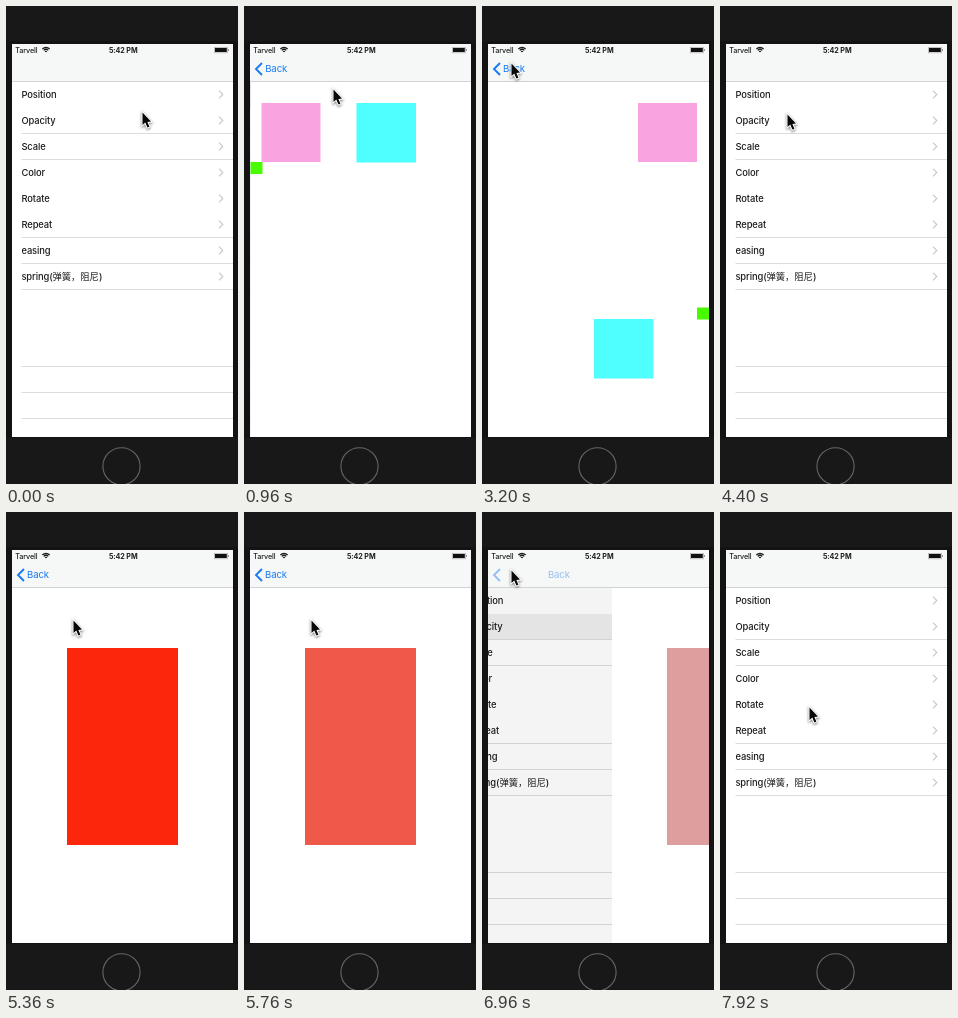
An HTML page with a canvas that plays this animation: 232 px wide and 478 px high, repeating every 8000 ms.

```html
<!DOCTYPE html>
<html lang="en">
<head>
<meta charset="utf-8">
<style>
html, body { margin: 0; width: 100%; height: 100%; overflow: hidden; background: #181818; }
canvas { display: block; width: 232px; height: 478px; }
</style>
</head>
<body>
<canvas width="232" height="478"></canvas>
<script>
const ctx = document.querySelector('canvas').getContext('2d');
const LOOP = 8000, STEP = 80;
const SCREEN = { x: 6, y: 38, w: 221, h: 393 };
const FONT = 'Inter, "Noto Sans CJK SC", "Noto Sans CJK", sans-serif';
const ROWS = ['Position', 'Opacity', 'Scale', 'Color', 'Rotate', 'Repeat', 'easing', 'spring(弹簧，阻尼)'];
const RULES = [127, 153, 231, 257, 283, 360, 386, 412];

// Each visit opens a detail page from a row and later goes back to the list.
const VISITS = [
  { row: 0, push: [560, 1020], pop: [3280, 3800], draw: drawPosition },
  { row: 1, push: [4640, 5200], pop: [6840, 7340], draw: drawOpacity }
];

// Pointer stops: time, x, y
const POINTER = [
  [0, 136, 106], [160, 96, 90], [240, 96, 90], [400, 89, 83], [1360, 89, 83],
  [1840, 22, 53], [2000, 22, 53], [2560, 29, 57], [3440, 29, 57], [4000, 32, 101],
  [4400, 67, 108], [5840, 67, 108], [6320, 47, 85], [6640, 29, 58], [7120, 29, 58],
  [7920, 89, 195]
];

const ramp = (t, from, to) => Math.min(1, Math.max(0, (t - from) / (to - from)));
const mix = (a, b, p) => a + (b - a) * p;
const easeOut = p => 1 - (1 - p) ** 3;

// cubic-bezier(.42, 0, .58, 1)
function easeInOut(p) {
  let lo = 0, hi = 1;
  for (let i = 0; i < 20; i++) {
    const s = (lo + hi) / 2;
    const x = 1.26 * (1 - s) ** 2 * s + 1.74 * (1 - s) * s * s + s ** 3;
    if (x < p) lo = s; else hi = s;
  }
  return lo * lo * (3 - 2 * lo);
}

function rect(color, x, y, w, h) {
  ctx.fillStyle = color;
  ctx.fillRect(x, y, w, h);
}

function text(str, x, y, size, color = '#1c1c1c', weight = 500, align = 'left') {
  ctx.font = `${weight} ${size}px ${FONT}`;
  ctx.letterSpacing = '-0.1px';
  ctx.textAlign = align;
  ctx.textBaseline = 'alphabetic';
  ctx.fillStyle = color;
  ctx.fillText(str, x, y);
}

function line(points, color, width) {
  ctx.beginPath();
  points.forEach(([x, y]) => ctx.lineTo(x, y));
  ctx.strokeStyle = color;
  ctx.lineWidth = width;
  ctx.stroke();
}

function drawList(selected, highlight) {
  rect('#fff', 6, 38, 221, 393);
  if (highlight > 0) {
    ctx.globalAlpha = highlight;
    rect('#d9d9d9', 6, 76 + selected * 26, 221, 26);
    ctx.globalAlpha = 1;
  }
  RULES.forEach(y => rect('#dcdcde', 15.5, y, 211.5, 1));
  ROWS.forEach((label, i) => {
    const y = 88.5 + i * 26;
    text(label, 15.4, y + 3.3, 9.4);
    line([[213, y - 3.8], [216.8, y], [213, y + 3.8]], '#c7c7cb', 1.1);
  });
}

function drawPosition(t) {
  const moved = start => easeInOut(ramp(t, start, start + 940));
  rect('#f9a4e0', mix(17, 156, moved(1020)), 97, 59, 59);
  rect('#4fffff', 112, mix(97, 313, moved(1510)), 59.5, 59.5);
  const p = moved(2075);
  rect('#48fb00', mix(6, 215, p), mix(156, 301.5, p), 12, 12);
}

function drawOpacity(t) {
  const p = easeInOut(ramp(t, 5330, 6270));
  const channels = [mix(252, 221, p), mix(38, 158, p), mix(13, 157, p)].map(Math.round);
  rect(`rgb(${channels})`, 61, 136, 111, 197);
}

function drawBar(open) {
  rect('#f6f7f7', 6, 38, 221, 37);
  rect('#d0d4d4', 6, 75, 221, 1);

  text('Tarvell', 9.2, 46.6, 7.2);
  text('5:42 PM', 117.2, 46.6, 7.2, '#1c1c1c', 700, 'center');
  ctx.strokeStyle = '#1c1c1c';
  ctx.lineWidth = 1.3;
  for (const r of [1.2, 3.2, 5.1]) {
    ctx.beginPath();
    ctx.arc(40, 46.6, r, -Math.PI * 0.75, -Math.PI * 0.25);
    ctx.stroke();
  }
  ctx.strokeStyle = '#b4b4b4';
  ctx.lineWidth = 0.8;
  ctx.strokeRect(208.4, 41.4, 13, 5.4);
  rect('#111', 209, 42, 11.8, 4);
  rect('#999', 222, 43, 1, 2);

  ctx.globalAlpha = open;
  line([[18, 57], [12, 63], [18, 69]], '#167bf3', 1.9);
  text('Back', 21 + 80 * (1 - open), 66.4, 9.6, '#167bf3', 400);
  ctx.globalAlpha = 1;
}

function drawPointer(t) {
  const next = POINTER.findIndex(stop => stop[0] > t);
  const b = POINTER[next < 0 ? POINTER.length - 1 : next];
  const a = next < 0 ? b : POINTER[next - 1];
  const p = a === b ? 0 : ramp(t, a[0], b[0]);
  ctx.save();
  ctx.translate(mix(a[1], b[1], p), mix(a[2], b[2], p));
  ctx.beginPath();
  [[0.5, 0.5], [0.5, 13], [3.3, 10.6], [5.4, 15.6], [7.4, 14.7], [5.4, 9.9], [9, 9.6]]
    .forEach(([x, y]) => ctx.lineTo(x, y));
  ctx.closePath();
  ctx.strokeStyle = '#fff';
  ctx.lineWidth = 2;
  ctx.shadowColor = 'rgba(0, 0, 0, 0.55)';
  ctx.shadowBlur = 2.5;
  ctx.shadowOffsetY = 1;
  ctx.stroke();
  ctx.shadowColor = 'transparent';
  ctx.fillStyle = '#080808';
  ctx.fill();
  ctx.restore();
}

function drawPhone() {
  rect('#181818', 0, 0, 232, 478);
  rect('#131313', 0, 35, 232, 397);
  ctx.beginPath();
  ctx.arc(115.5, 460.3, 18.6, 0, Math.PI * 2);
  ctx.strokeStyle = '#666';
  ctx.lineWidth = 1.1;
  ctx.stroke();
}

function draw(t) {
  const visit = VISITS[t < 4200 ? 0 : 1];
  const open = easeOut(ramp(t, ...visit.push)) - easeOut(ramp(t, ...visit.pop));
  const pressed = t >= visit.push[0] - 80 && t < visit.pop[0];

  drawPhone();
  ctx.save();
  ctx.beginPath();
  ctx.rect(SCREEN.x, SCREEN.y, SCREEN.w, SCREEN.h);
  ctx.clip();

  ctx.save();
  ctx.translate(-open * SCREEN.w * 0.3, 0);
  drawList(visit.row, pressed ? 1 : open);
  ctx.restore();

  if (open > 0) {
    rect(`rgba(0, 0, 0, ${0.1 * open})`, 6, 38, 221, 393);
    ctx.save();
    ctx.translate((1 - open) * SCREEN.w, 0);
    rect('#fff', 6, 38, 221, 393);
    visit.draw(t);
    ctx.restore();
  }
  drawBar(open);
  ctx.restore();
  drawPointer(t);
}

const started = performance.now();
function tick() {
  const t = (performance.now() - started) % LOOP;
  draw(Math.floor(t / STEP) * STEP);
  requestAnimationFrame(tick);
}
tick();
</script>
</body>
</html>
```
